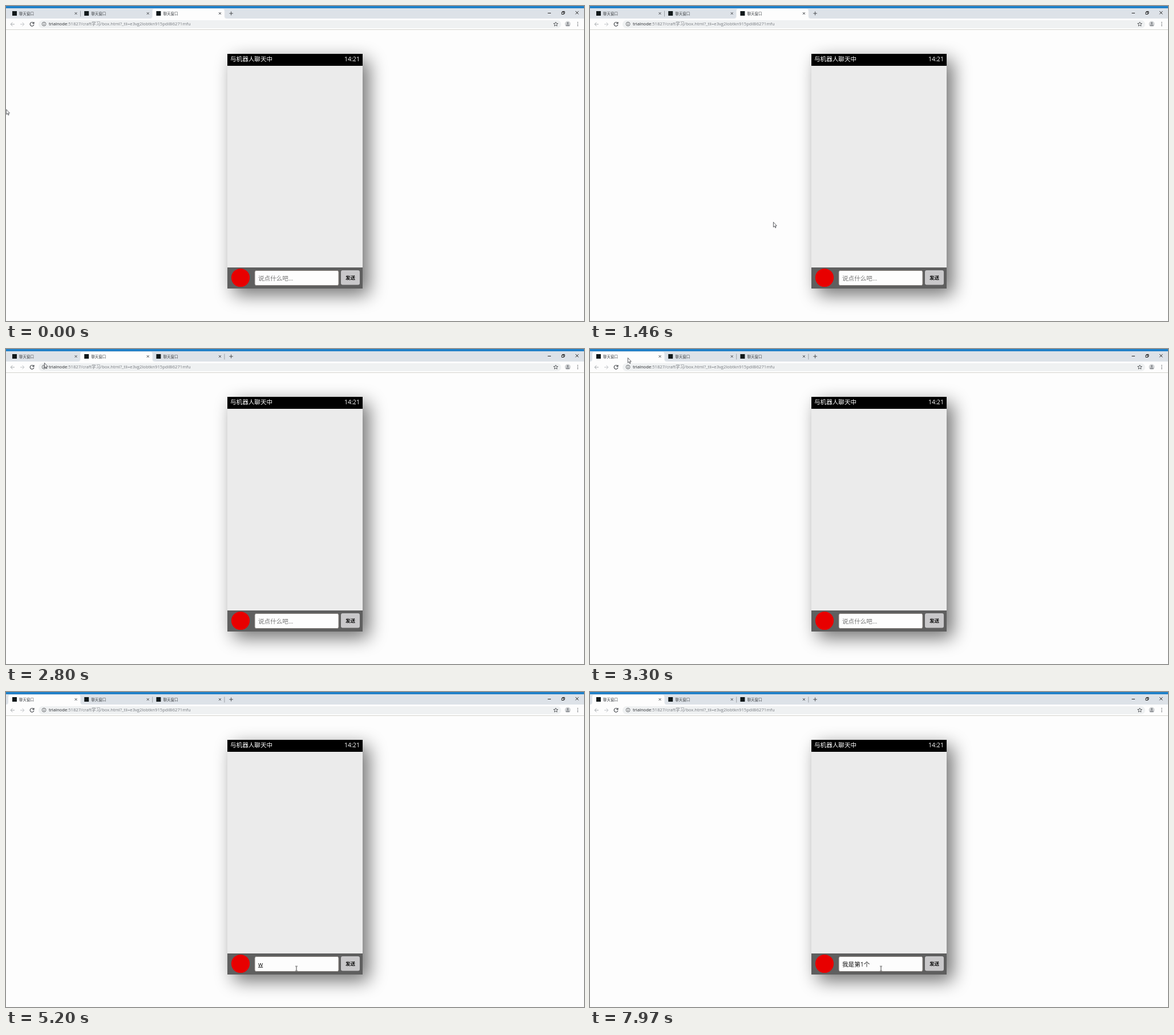
These frames come from a looping animation (1013x553 px, 8000 ms). An HTML page:

```html
<!DOCTYPE html>
<html lang="zh">
<head>
<meta charset="utf-8">
<title>聊天窗口</title>
<style>
html, body { margin: 0; width: 100%; height: 100%; overflow: hidden; background: #fdfdfd; }
svg.stage { display: block; width: 100%; height: 100%; }
text { font-family: "Open Sans", "Noto Sans CJK SC", "Noto Sans CJK", sans-serif; white-space: pre; }
.tab { font-size: 6.5px; fill: #404448; }
.url { font-size: 7.65px; fill: #777b80; }
.url tspan { fill: #25282c; }
.bar { font-size: 10.6px; fill: #fff; }
.lines { font-size: 10.6px; fill: #111; }
.lines .hint { fill: #757575; }
.lines .ime { text-decoration: underline; }
.send { font-size: 8.5px; font-weight: 700; fill: #0a0a0a; text-anchor: middle; }
.icon { fill: none; stroke: #4a4d51; stroke-width: 1; }
.dark { stroke: #222; }

.active, .lines, .pointer, .arrow, .beam { animation: 8s linear infinite; }
.active { animation-name: switch; animation-timing-function: step-end; }
.lines { animation-name: type; animation-timing-function: step-end; }
.pointer { animation-name: move; }
.arrow { animation-name: arrow; animation-timing-function: step-end; }
.beam { animation-name: beam; animation-timing-function: step-end; }

@keyframes switch {
  0% { transform: translateX(252.4px); }
  29% { transform: translateX(126.2px); }
  38.2%, 100% { transform: none; }
}
@keyframes move {
  0% { transform: translate(0, 181px); }
  7.5% { transform: translate(90px, 254px); }
  18.25% { transform: translate(321px, 379px); }
  20.5% { transform: translate(318px, 362px); }
  27.5% { transform: translate(192px, 14px); }
  30.5% { transform: translate(186px, 14px); }
  35% { transform: translate(67px, 24px); }
  37% { transform: translate(64px, 14px); }
  41.5% { transform: translate(66px, 15px); }
  48.8%, 50% { transform: translate(507.5px, 491.5px); }
  53%, 80.5% { transform: translate(509px, 485.5px); }
  100% { transform: translate(510px, 485.5px); }
}
@keyframes arrow {
  0% { visibility: visible; }
  48.6%, 100% { visibility: hidden; }
}
@keyframes beam {
  0% { visibility: hidden; }
  48.6%, 100% { visibility: visible; }
}
/* Each step scrolls the field to its next state, 23px apart. */
@keyframes type {
  0% { transform: none; }
  65% { transform: translateY(-23px); }
  66.6% { transform: translateY(-46px); }
  68.5% { transform: translateY(-69px); }
  69.5% { transform: translateY(-92px); }
  70.6% { transform: translateY(-115px); }
  74.3% { transform: translateY(-138px); }
  78.7% { transform: translateY(-161px); }
  80% { transform: translateY(-184px); }
  84.3% { transform: translateY(-207px); }
  88.1% { transform: translateY(-230px); }
  91.8% { transform: translateY(-253px); }
  93.4% { transform: translateY(-276px); }
  96.3%, 100% { transform: translateY(-299px); }
}
</style>
</head>
<body>
<svg class="stage" viewBox="0 0 1013 553" preserveAspectRatio="none">
  <defs>
    <filter id="soft" x="-30%" y="-20%" width="160%" height="140%">
      <feGaussianBlur stdDeviation="16"/>
    </filter>
    <g id="label">
      <rect x="11" y="9" width="8" height="8" fill="#10181a"/>
      <text class="tab" x="23" y="15.7">聊天窗口</text>
      <path class="icon" d="M120.5 11l4 4m0-4l-4 4"/>
    </g>
  </defs>

  <rect width="1013" height="553" fill="#fdfdfd"/>

  <!-- Tab strip -->
  <rect y="3" width="1013" height="19" fill="#dde2e8"/>
  <rect width="1013" height="4" fill="#2080c8"/>
  <path d="M130.5 8.5v10M256.7 8.5v10M382.9 8.5v10" stroke="#8d9297" stroke-width=".8"/>
  <g class="active">
    <rect x="2" y="7" width="130.5" height="13" fill="#dde2e8"/>
    <path d="M0 22Q4 22 4 18V9Q4 5 8 5H126.5Q130.5 5 130.5 9V18Q130.5 22 134.5 22Z" fill="#fdfdfd"/>
  </g>
  <use href="#label"/>
  <use href="#label" x="126.2"/>
  <use href="#label" x="252.4"/>
  <path class="icon" d="M391.3 13h6.6m-3.3-3.3v6.6"/>
  <path class="icon dark" d="M949.5 12.5h5.5M998.2 9.2l5.2 5.2m0-5.2l-5.2 5.2"/>
  <path class="icon dark" d="M974 10.8h3.7v3.7H974zM975.3 10.8V9.5H979v3.7h-1.3"/>

  <!-- Toolbar -->
  <rect y="22" width="1013" height="19" fill="#fdfdfd"/>
  <rect y="41" width="1013" height="1" fill="#d3d3cd"/>
  <rect x="57" y="25" width="916" height="14" rx="7" fill="#eff1f2"/>
  <path class="icon" d="M15 32H8.2m3.2-3.3L8.2 32l3.2 3.3" style="stroke:#a5a8ab"/>
  <path class="icon" d="M25 32h6.8m-3.2-3.3l3.2 3.3l-3.2 3.3" style="stroke:#bfc2c5"/>
  <path class="icon" d="M48.2 29.7a3.4 3.4 0 1 0 .7 3M49 28v2.6h-2.7" style="stroke-width:1.2"/>
  <circle class="icon" cx="66.6" cy="31.6" r="3.4" style="stroke-width:.8"/>
  <path class="icon" d="M66.6 31v2.4m0-4v.9"/>
  <text class="url" x="75" y="34.3"><tspan>trialnode</tspan>:51827/craft学习/box.html?_tli=e3vg2lobtkn915pdi8l6271mfu</text>
  <path class="icon" d="M963.5 28l1.1 2.5l2.7.2l-2.1 1.8l.7 2.7l-2.4-1.5l-2.4 1.5l.7-2.7l-2.1-1.8l2.7-.2z" style="stroke-width:.9"/>
  <circle cx="984.5" cy="31.6" r="5" fill="#d2d4d6"/>
  <circle cx="984.5" cy="30" r="1.7" fill="#85898d"/>
  <path d="M981.2 34.8q0-2.4 3.3-2.4t3.3 2.4z" fill="#85898d"/>
  <path d="M1002 28.8v0m0 2.9v0m0 2.9v0" stroke="#4a4d51" stroke-width="1.6" stroke-linecap="round"/>

  <!-- Chat panel -->
  <rect x="398.6" y="94.6" width="237" height="412" fill="#000" opacity=".56" filter="url(#soft)"/>
  <rect x="388" y="84" width="237" height="412" fill="#ebebeb"/>
  <rect x="388" y="84" width="237" height="21" fill="#000"/>
  <text class="bar" x="393" y="97.4">与机器人聊天中</text>
  <text class="bar" x="620" y="97.4" text-anchor="end">14:21</text>
  <rect x="388" y="459" width="237" height="37" fill="#5f5f5f"/>
  <circle cx="411" cy="477" r="16.1" fill="#e80000"/>
  <rect x="436" y="464.5" width="147" height="26" rx="2.5" fill="#fdfdfd" stroke="#88827e"/>
  <svg x="440" y="466" width="141" height="23" overflow="hidden">
    <g class="lines">
      <text class="hint" x="2" y="15.7">说点什么吧...</text>
      <text x="2" y="38.7"><tspan class="ime">w</tspan></text>
      <text x="2" y="61.7"><tspan class="ime">wo</tspan></text>
      <text x="2" y="84.7"><tspan class="ime">wo's</tspan></text>
      <text x="2" y="107.7"><tspan class="ime">wo'sh</tspan></text>
      <text x="2" y="130.7"><tspan class="ime">wo'shi</tspan></text>
      <text x="2" y="153.7">我是</text>
      <text x="2" y="176.7">我是<tspan class="ime">d</tspan></text>
      <text x="2" y="199.7">我是<tspan class="ime">di</tspan></text>
      <text x="2" y="222.7">我是第</text>
      <text x="2" y="245.7">我是第1</text>
      <text x="2" y="268.7">我是第1<tspan class="ime">g</tspan></text>
      <text x="2" y="291.7">我是第1<tspan class="ime">ge</tspan></text>
      <text x="2" y="314.7">我是第1个</text>
    </g>
  </svg>
  <rect x="587" y="464" width="33" height="25.5" rx="3" fill="#c9c8ca"/>
  <text class="send" x="603.5" y="479.8">发送</text>

  <!-- Mouse pointer -->
  <g class="pointer">
    <path class="arrow" d="M.4.5V9.2L2.4 7.4L3.8 10.5L5 10L3.7 7H6.3Z" fill="#fff" stroke="#33353a" stroke-width=".8"/>
    <path class="beam" d="M-2-4h1.4L0-3.5L.6-4H2M0-3.5v7M-2 4h1.4L0 3.5L.6 4H2" fill="none" stroke="#333" stroke-width=".9"/>
  </g>
</svg>
</body>
</html>
```
